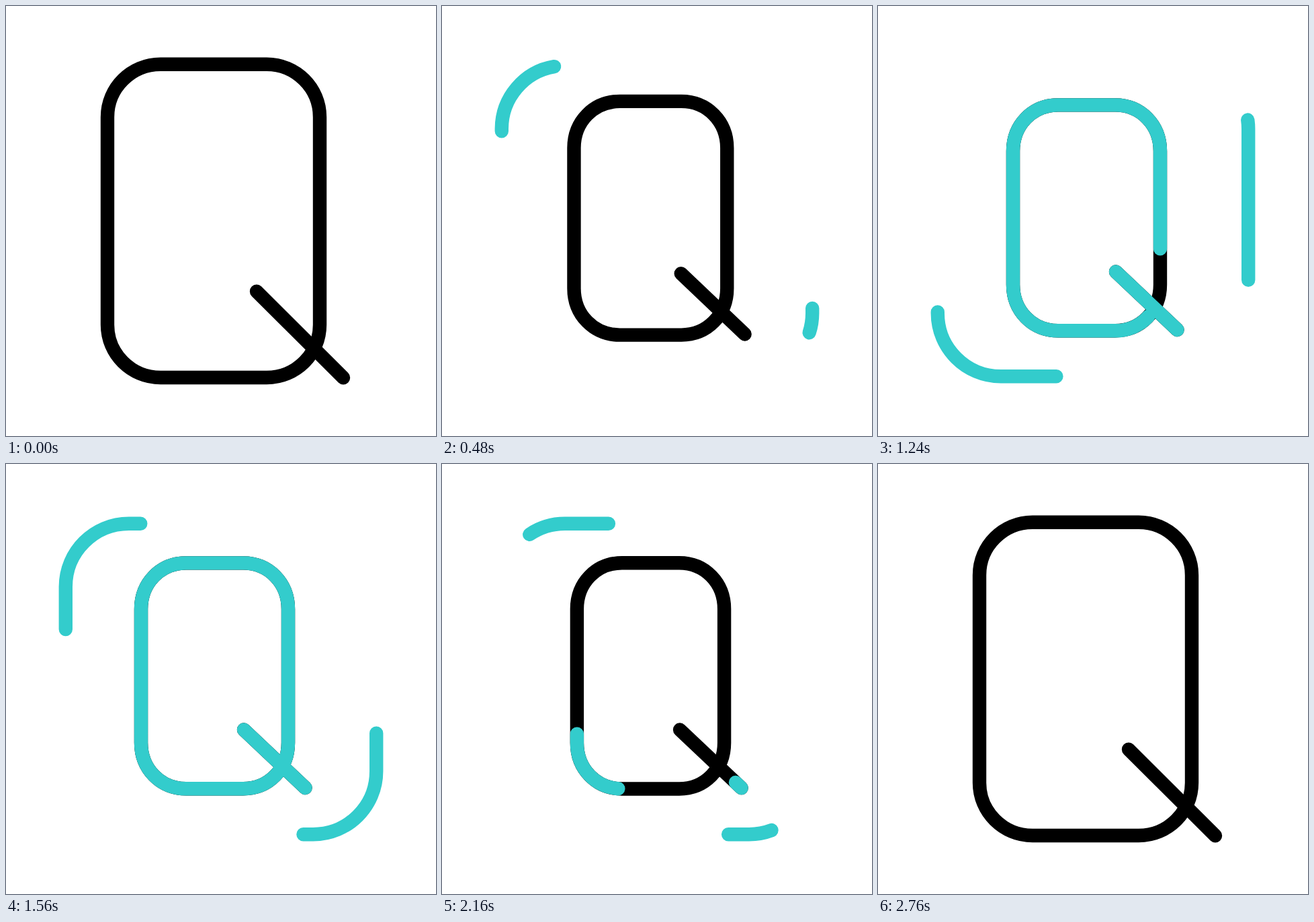
Write an HTML page that moves like this. It is 640 by 640 pixels and loops after 3000 ms.

```html
<!DOCTYPE html>
<html lang="en">
<head>
<meta charset="utf-8">
<title>Letter Q</title>
<style>
  html, body { margin: 0; width: 100%; height: 100%; overflow: hidden; background: #fff; }
  svg { display: block; width: 100vw; height: 100vh; }
  path { fill: none; stroke: #000; stroke-width: 20.4; stroke-linecap: round; stroke-linejoin: round; }
  .teal { stroke: #3cc; }
</style>
</head>
<body>
<svg viewBox="0 0 640 640">
  <path id="bowl"/>
  <path id="tail"/>
  <path id="bowlTrim" class="teal" pathLength="2"/>
  <path id="tailTrim" class="teal" pathLength="1"/>
  <path id="cometA" class="teal"/>
  <path id="cometB" class="teal"/>
</svg>
<script>
const LOOP = 3000, STEP = 40;
const el = id => document.getElementById(id);
const mix = (a, b, k) => a + (b - a) * k;
const blend = (a, b, k) => a.map((v, i) => mix(v, b[i], k));

// Progress from time a to b; power p slows the start, power q slows the end.
const span = (t, a, b) => Math.min(1, Math.max(0, (t - a) / (b - a)));
const rise = (t, a, b, p = 1, q = 1) => 1 - (1 - span(t, a, b) ** p) ** q;
const smooth = (t, a, b) => {
  const u = span(t, a, b);
  return u * u * (3 - 2 * u);
};

// left, top, right, bottom, corner radii, corner tension
const BIG = [151, 86.8, 467, 553, 79, 78.6, 0.5523];
const SMALL = [201, 147.4, 420, 483.3, 67, 68.5, 0.57];
const FRAME = [88.8, 88.8, 551.2, 551.2, 94, 94, 0.5523];
const TAIL_BIG = [373, 424.8, 502, 553.2];
const TAIL_SMALL = [354, 395.5, 445.5, 482];

const GROW_AT = 560, TURN = 1550, ERASE_AT = 1595;
const GROW_FROM = 0.738;

// Clockwise laps of a rounded box, starting `lift` above its lower left corner.
function laps([l, t, r, b, rx, ry, k], count, lift = 0) {
  const y = b - ry - lift;
  const corner = (ax, ay, cx, cy, bx, by) =>
    `L${ax} ${ay}C${mix(ax, cx, k)} ${mix(ay, cy, k)} ${mix(bx, cx, k)} ${mix(by, cy, k)} ${bx} ${by}`;
  const lap = corner(l, t + ry, l, t, l + rx, t) +
    corner(r - rx, t, r, t, r, t + ry) +
    corner(r, b - ry, r, b, r - rx, b) +
    corner(l + rx, b, l, b, l, b - ry) + `L${l} ${y}`;
  return `M${l} ${y}` + lap.repeat(count);
}

function trim(id, from, to) {
  const path = el(id), len = to - from;
  path.style.display = len > 1e-4 ? "" : "none";
  path.setAttribute("stroke-dasharray", `${Math.max(len, 0)} 9999`);
  path.setAttribute("stroke-dashoffset", -from);
}

for (const id of ["cometA", "cometB"]) el(id).setAttribute("d", laps(FRAME, 2));

function drawLetter(t) {
  const k = smooth(t, 160, 553) - smooth(t, 2145, 2730);
  const box = blend(BIG, SMALL, k);
  const [x1, y1, x2, y2] = blend(TAIL_BIG, TAIL_SMALL, k);
  const tail = `M${x1} ${y1}L${x2} ${y2}`;

  el("bowl").setAttribute("d", laps(box, 1, 13.5) + "Z");
  el("bowlTrim").setAttribute("d", laps(box, 2, 13.5));
  el("tail").setAttribute("d", tail);
  el("tailTrim").setAttribute("d", tail);
}

function drawTeal(t) {
  if (t < TURN) trim("bowlTrim", GROW_FROM, GROW_FROM + rise(t, GROW_AT, 1320));
  else trim("bowlTrim", rise(t, ERASE_AT, 2450, 1, 2), 1);
  trim("tailTrim", rise(t, ERASE_AT, 2390, 1, 1.9), rise(t, GROW_AT, 1150));

  // Each comet's back end travels in two legs, its front end in one.
  trim("cometA",
    271 + 788 * rise(t, 480, TURN) + 238 * rise(t, TURN, 2390),
    271 + 1026 * rise(t, 340, 1600, 1, 1.2));
  trim("cometB",
    1111 + 788 * rise(t, 480, TURN, 2.4) + 276 * rise(t, TURN, 2390, 1.8),
    1111 + 1064 * rise(t, 200, 1590, 2.1));
}

const began = performance.now();
function tick() {
  const now = (performance.now() - began) % LOOP;
  const t = Math.floor(now / STEP) * STEP;
  drawLetter(t);
  drawTeal(t);
  requestAnimationFrame(tick);
}
tick();
</script>
</body>
</html>
```
